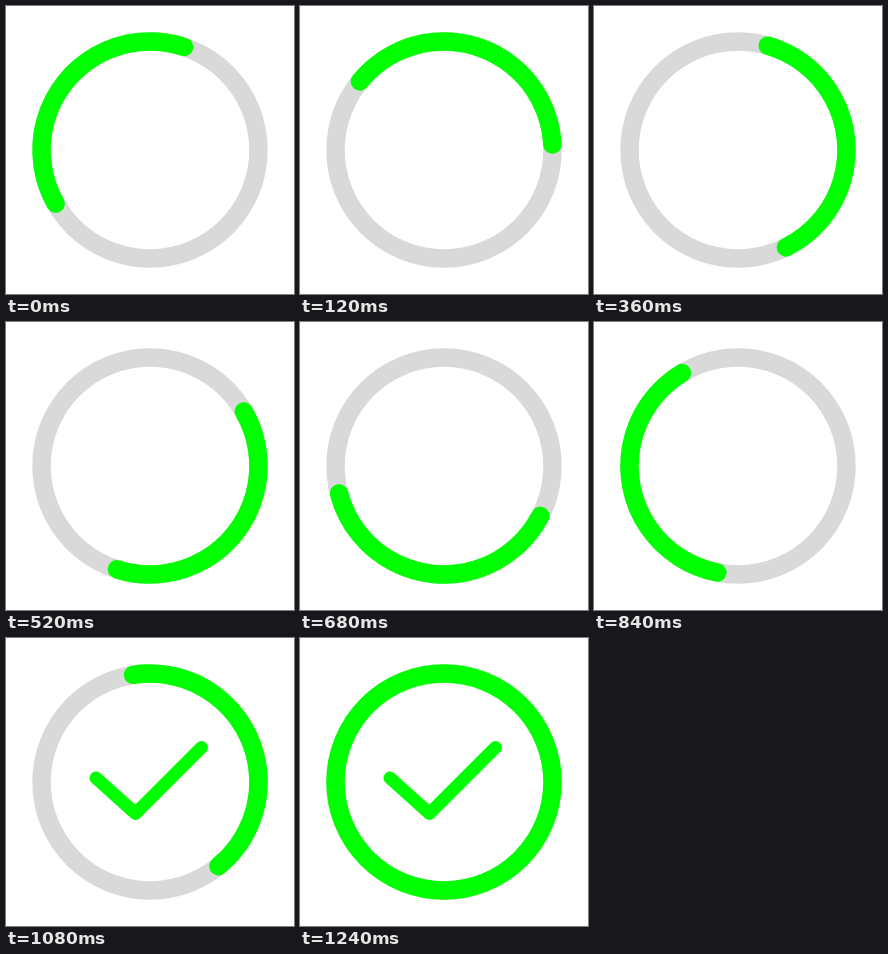
An HTML page with a canvas that plays this animation: 288 px wide and 288 px high, repeating every 2040 ms.

```html
<!DOCTYPE html>
<html lang="en">
<head>
<meta charset="utf-8">
<title>Loading to done</title>
<style>
  html, body { margin: 0; width: 100%; height: 100%; overflow: hidden; background: #fff; }
  canvas { display: block; width: 288px; height: 288px; }
</style>
</head>
<body>
<canvas id="stage" width="288" height="288"></canvas>
<script>
const ctx = document.getElementById("stage").getContext("2d");

const LOOP = 2040, STEP = 40, CLOSED = 1240;
const CENTER = 144, RADIUS = 108.5, RING_WIDTH = 18.5;
const GREEN = "#00ff00", GRAY = "#d9d9d9";

// Keys: [time in ms, degrees clockwise from the top, degrees per ms]
const TAIL = [
  [0, 240.4, 0.67], [120, 309.2, 0.46], [360, 375.9, 0.22], [680, 477.4, 0.39],
  [840, 551, 0.53], [1040, 689, 0.7], [1080, 711, 0.1], [1120, 712, 0], [CLOSED, 712, 0]
];
const SWEEP = [
  [0, 137.9, 0], [960, 137.9, 0], [1080, 149.9, 0.45], [CLOSED, 360, 1.7]
];

const CHECK = [[90, 140], [129.5, 175.5], [195.5, 109.5]];
const CHECK_START = 860, CHECK_END = 1070;

// Cubic Hermite interpolation between keys
function sample(keys, time) {
  let i = 0;
  while (i < keys.length - 2 && time >= keys[i + 1][0]) i++;
  const [t0, a, va] = keys[i], [t1, b, vb] = keys[i + 1];
  const span = t1 - t0;
  const u = Math.min(1, (time - t0) / span);
  const u2 = u * u, u3 = u2 * u;
  return (2 * u3 - 3 * u2 + 1) * a + (u3 - 2 * u2 + u) * span * va
    + (3 * u2 - 2 * u3) * b + (u3 - u2) * span * vb;
}

function strokeArc(color, from, sweep) {
  const start = (from - 90) * Math.PI / 180;
  ctx.beginPath();
  ctx.arc(CENTER, CENTER, RADIUS, start, start + sweep * Math.PI / 180);
  ctx.strokeStyle = color;
  ctx.lineWidth = RING_WIDTH;
  ctx.stroke();
}

function strokeCheck(progress) {
  if (progress <= 0) return;
  const lengths = [0, 1].map(i =>
    Math.hypot(CHECK[i + 1][0] - CHECK[i][0], CHECK[i + 1][1] - CHECK[i][1]));
  let left = Math.min(1, progress) * (lengths[0] + lengths[1]);
  ctx.beginPath();
  ctx.moveTo(...CHECK[0]);
  for (let i = 0; i < 2 && left > 0; i++) {
    const [x, y] = CHECK[i], [nx, ny] = CHECK[i + 1];
    const part = Math.min(1, left / lengths[i]);
    ctx.lineTo(x + (nx - x) * part, y + (ny - y) * part);
    left -= lengths[i];
  }
  ctx.strokeStyle = GREEN;
  ctx.lineWidth = 13;
  ctx.stroke();
}

function draw(now) {
  const time = Math.floor((now % LOOP) / STEP) * STEP;
  ctx.fillStyle = "#fff";
  ctx.fillRect(0, 0, 288, 288);
  ctx.lineCap = ctx.lineJoin = "round";
  strokeArc(GRAY, 0, 360);
  if (time >= CLOSED) strokeArc(GREEN, 0, 360);
  else strokeArc(GREEN, sample(TAIL, time), sample(SWEEP, time));
  strokeCheck((time - CHECK_START) / (CHECK_END - CHECK_START));
}

const began = performance.now();
function tick() {
  draw(performance.now() - began);
  requestAnimationFrame(tick);
}
tick();
</script>
</body>
</html>
```
